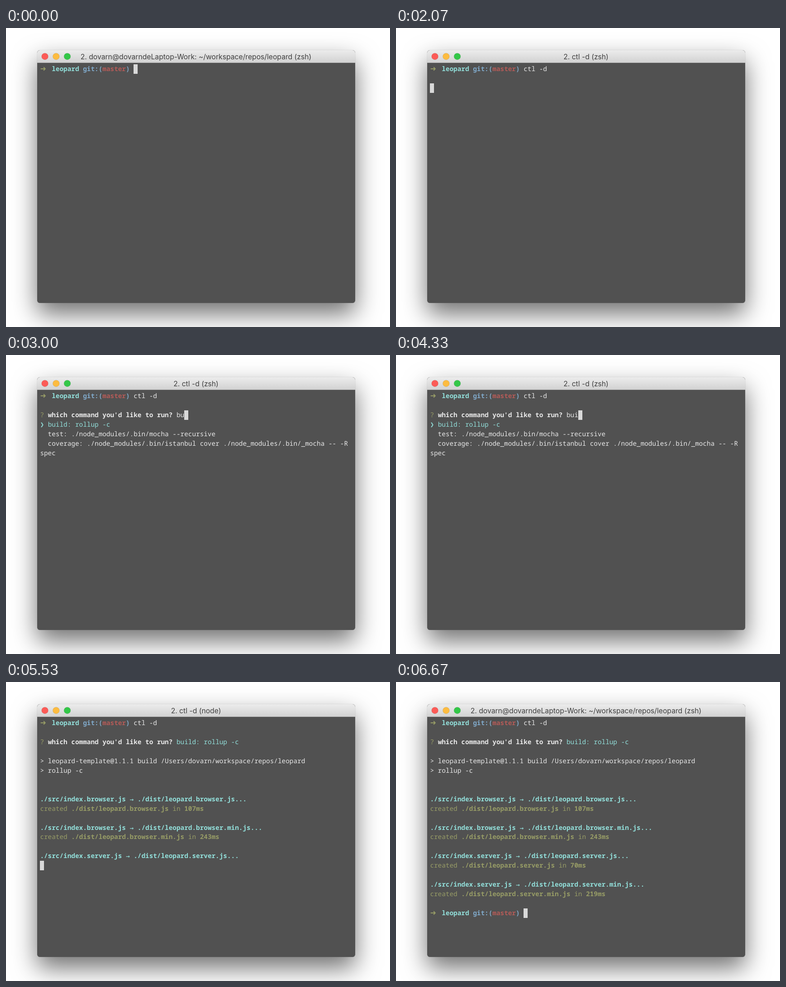
Recreate the animation shown at these times as an HTML page. Size 849 px wide and 659 px high, loop 6.74 s.

```html
<!DOCTYPE html>
<html lang="en">
<head>
<meta charset="utf-8">
<title>Terminal</title>
<style>
  html, body { margin: 0; width: 100%; height: 100%; overflow: hidden; background: #fff; }
  #win {
    position: absolute; left: 69px; top: 49px; width: 703px; height: 557px;
    background: #515151; border-radius: 6px;
    box-shadow: 0 0 1px rgba(0,0,0,.5), 0 24px 54px rgba(0,0,0,.56);
  }
  #bar {
    height: 27px; border-bottom: 1px solid #b0b0b0; border-radius: 6px 6px 0 0;
    background: linear-gradient(#ececec, #d2d2d2);
  }
  #bar svg { position: absolute; left: 0; top: 0; stroke: rgba(0,0,0,.1); }
  #title {
    position: absolute; left: 0; width: 702px; top: .6px; line-height: 28px; text-align: center;
    white-space: pre; color: #404040; font-family: Inter, Roboto, sans-serif; font-size: 15.7px;
  }
  #text {
    position: absolute; left: 75.4px; top: 81.2px; color: #e8e8e8; font-weight: 500;
    font-family: "Noto Sans Mono", "DejaVu Sans Mono", monospace; font-size: 14.375px;
    text-rendering: geometricPrecision; font-variant-ligatures: none;
  }
  #text div { height: 20.95px; line-height: 20.95px; white-space: pre; }
  #text i { display: inline-block; width: 8.625px; line-height: 1px; font-style: normal; }
  #text .arrow { font: 16px/1px "DejaVu Sans", sans-serif; }
  #text .to { font: bold 10.5px/1px "DejaVu Sans", sans-serif; }
  #cursor { position: absolute; width: 9px; height: 21px; background: #d9d9d9; }
  .cyan { color: #92dfda; }
  .olive { color: #979c66; }
  .blue { color: #80a9c9; }
  .red { color: #b35b58; }
</style>
</head>
<body>
<div id="win">
  <div id="bar">
    <svg width="90" height="27">
      <circle cx="17" cy="13.7" r="7.3" fill="#fc5b57"/>
      <circle cx="41.8" cy="13.7" r="7.3" fill="#fdbc40"/>
      <circle cx="66.5" cy="13.7" r="7.3" fill="#33c748"/>
    </svg>
    <div id="title"></div>
  </div>
</div>
<div id="cursor"></div>
<div id="text"></div>
<script>
const LOOP = 6740, CELL_W = 8.625, CELL_H = 20.95;
const $ = id => document.getElementById(id);
const span = (color, s) => `<span class="${color}">${s}</span>`;
const bold = (color, s) => `<b class="${color}">${s}</b>`;

const PROMPT = '<i class="olive arrow">➜</i>  ' + bold('cyan', 'leopard') + ' ' +
  bold('blue', 'git:(') + bold('red', 'master') + bold('blue', ')') + ' ';
const QUESTION = span('olive', '?') + " <b>which command you'd like to run?</b> ";
const MATCHES = [
  span('cyan', '<i>❯</i> build: rollup -c'),
  '  test: ./node_modules/.bin/mocha --recursive',
  '  coverage: ./node_modules/.bin/istanbul cover ./node_modules/.bin/_mocha -- -R',
  'spec'
];
const OTHERS = [
  '  dev: rollup -c -w',
  '  lint: eslint ./src',
  '  clean: rimraf ./dist',
  '  prepare: npm run lint',
  '  start: node ./src/index.server.js'
];

const COMMAND = 'ctl -d', KEYS = [270, 400, 530, 730, 930, 1130];
const QUERY = 'bui', QUERY_KEYS = [2870, 2930, 3270];
const ENTER = 1600, LIST = 2400, ANSWER = 4600, NPM = 4870, DONE = 5870;
// output name, time taken, when its header and its result are printed
const BUILDS = [
  ['browser', '', 107, 5200, 5330],
  ['browser', '.min', 243, 5330, 5530],
  ['server', '', 70, 5530, 5600],
  ['server', '.min', 219, 5600, 5800]
];
const HOME = 'dovarn@dovarndeLaptop-Work: ~/workspace/repos/leopard';
const TITLES = [
  [6600, HOME + ' (zsh)'],
  [DONE, HOME + ' (node)'],
  [NPM, 'ctl -d (node)'],
  [ENTER, 'ctl -d (zsh)'],
  [0, HOME + ' (zsh)']
];

const typed = (text, keys, t) => text.slice(0, keys.filter(k => t >= k).length);

function screen(t) {
  const command = typed(COMMAND, KEYS, t);
  const rows = [PROMPT + command];
  if (t < ENTER) return { rows, col: 24 + command.length, row: 0 };
  rows.push('');
  if (t < LIST) return { rows, col: 0, row: 2 };
  if (t < ANSWER) {
    const query = typed(QUERY, QUERY_KEYS, t);
    rows.push(QUESTION + query, ...MATCHES, ...(query ? [] : OTHERS));
    return { rows, col: 35 + query.length, row: 2 };
  }
  rows.push(QUESTION + span('cyan', 'build: rollup -c'));
  if (t < NPM) return { rows, col: 0, row: 3 };
  rows.push('', '&gt; leopard-template@1.1.1 build /Users/dovarn/workspace/repos/leopard',
    '&gt; rollup -c', '');
  for (const [name, min, ms, start, end] of BUILDS) {
    if (t < start) break;
    const path = `./dist/leopard.${name}${min}.js`;
    rows.push('', bold('cyan', `./src/index.${name}.js <i class="to">→</i> ${path}...`));
    if (t >= end) rows.push(span('olive', `created <b>${path}</b> in <b>${ms}ms</b>`));
  }
  if (t < DONE) return { rows, col: 0, row: rows.length };
  rows.push('', PROMPT);
  return { rows, col: 24, row: rows.length - 1 };
}

let shown = '';
function draw(now) {
  const t = now % LOOP;
  const { rows, col, row } = screen(t);
  const html = rows.map(r => `<div>${r}</div>`).join('');
  if (html !== shown) $('text').innerHTML = shown = html;
  $('title').textContent = '2. ' + TITLES.find(([from]) => t >= from)[1];
  $('cursor').style.left = Math.round(75 + col * CELL_W) + 'px';
  $('cursor').style.top = Math.round(80 + row * CELL_H) + 'px';
  requestAnimationFrame(draw);
}
draw(performance.now());
</script>
</body>
</html>
```
